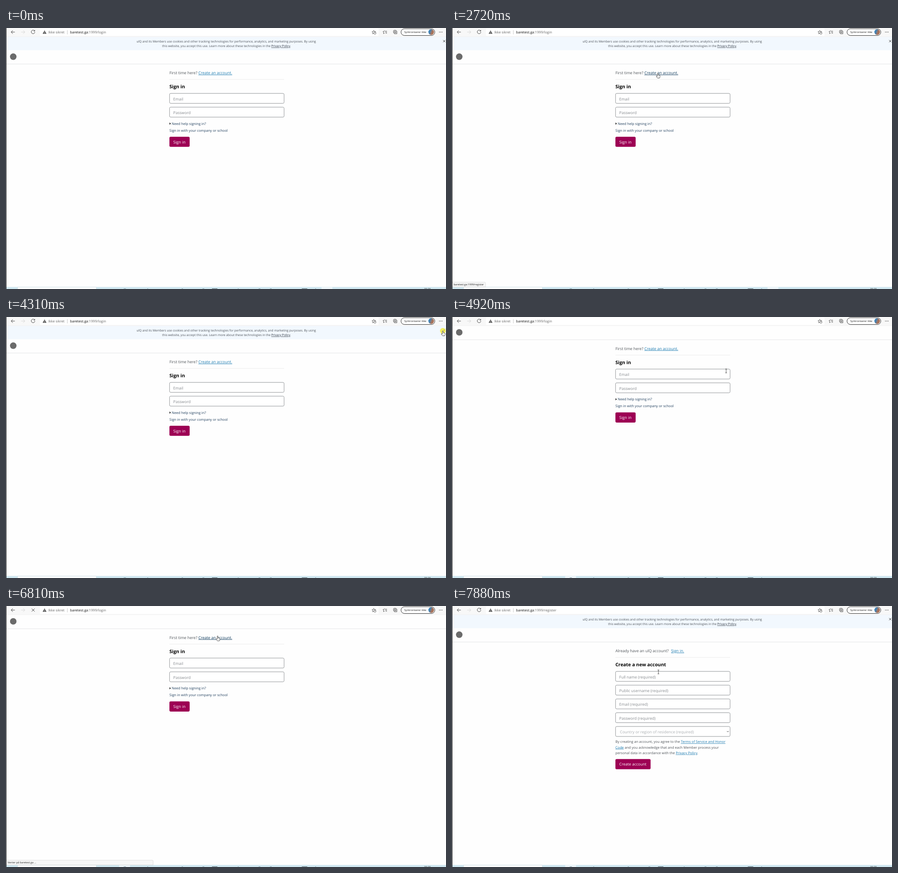
Recreate the animation shown at these times as an HTML page. Size 972 px wide and 576 px high, loop 8 s.

```html
<!DOCTYPE html>
<html lang="en">
<head>
<meta charset="utf-8">
<title>Sign in and register</title>
<style>
html, body { margin: 0; width: 100%; height: 100%; overflow: hidden; background: #fefefe; }
svg { display: block; width: 972px; height: 576px; }
text { font: 8.58px "Open Sans", "Noto Sans", sans-serif; fill: #50555a; white-space: pre; text-rendering: geometricPrecision; }
.title { font-size: 10.4px; font-weight: 700; fill: #000; }
.small { font-size: 7.65px; }
.navy { fill: #23415f; }
.note { font-size: 6.7px; fill: #4a4f55; }
.url { font-size: 7.62px; fill: #666; }
.tiny { font-size: 5.72px; fill: #222; }
.hint { fill: #85898d; }
.pale { fill: #a9adb0; }
.white { fill: #fff; }
.link { fill: #1a7ab0; text-decoration: underline; }
.hover { fill: #0e3a5c; }
.dark { fill: #222b35; text-decoration: underline; }
.icon { fill: none; stroke: #333; stroke-width: .9; }
</style>
</head>
<body>
<svg viewBox="0 0 972 576">
  <defs>
    <linearGradient id="photo" x2="1" y2=".4">
      <stop offset=".35" stop-color="#3f83b8"/><stop offset=".75" stop-color="#a9735a"/>
    </linearGradient>
  </defs>
  <rect width="972" height="576" fill="#fefefe"/>

  <g id="header">
    <path d="M0 79.5H972" stroke="#e4e5e6"/>
    <circle id="logo" cx="16" cy="63.3" r="7.2" fill="#6b6b6b"/>
  </g>

  <g id="banner">
    <rect y="19.5" width="972" height="29.5" fill="#f2f8fe"/>
    <text class="note" x="288.5" y="31.6">ulQ and its Members use cookies and other tracking technologies for performance, analytics, and marketing purposes. By using</text>
    <text class="note" x="345" y="42.3">this website, you accept this use. Learn more about these technologies in the <tspan class="dark">Privacy Policy</tspan>.</text>
    <path class="icon" d="M965.5 26.5l5 5m0-5l-5 5" stroke="#666"/>
  </g>

  <g id="login">
    <text x="361" y="102">First time here?</text>
    <text x="425" y="102" class="link" id="create">Create an account.</text>
    <path d="M361 113.5H614.5" stroke="#ececec"/>
    <text x="361" y="133" class="title">Sign in</text>
    <g id="loginFields"></g>
    <path d="M361.3 208.6l2.8 2.4-2.8 2.4z" fill="#111"/>
    <text x="366" y="213.9" class="small navy">Need help signing in?</text>
    <text x="361" y="228.7" class="small navy">Sign in with your company or school</text>
    <rect x="361" y="240" width="44.7" height="22.3" rx="2.8" fill="#9d0054"/>
    <text x="369.5" y="254.6" class="white" style="font-size:8.8px">Sign in</text>
  </g>

  <g id="register">
    <text x="361" y="102">Already have an ulQ account?</text>
    <text x="484" y="102" class="link">Sign in.</text>
    <path d="M361 113.5H614.5" stroke="#ececec"/>
    <text x="361" y="133" class="title">Create a new account</text>
    <g id="registerFields"></g>
    <path class="icon" d="M607.4 276l2 2 2-2" stroke="#555"/>
    <text x="361" y="302.3" class="small">By creating an account, you agree to the <tspan class="link">Terms of Service and Honor</tspan></text>
    <text x="361" y="314.5" class="small"><tspan class="link">Code</tspan> and you acknowledge that and each Member process your</text>
    <text x="361" y="326.7" class="small">personal data in accordance with the <tspan class="link">Privacy Policy</tspan>.</text>
    <rect x="361" y="337.8" width="77.7" height="22.4" rx="2.8" fill="#9d0054"/>
    <text x="369.5" y="352.4" class="white">Create account</text>
    <g id="social">
      <path d="M361 372.5H614.5" stroke="#ececec"/>
      <text x="361" y="391.5">or create an account using</text>
      <rect x="361" y="409.7" width="253.5" height="18.6" rx="3" fill="#eee"/>
      <rect x="361" y="430.5" width="253.5" height="18.6" rx="3" fill="#eee"/>
    </g>
  </g>

  <g id="toolbar">
    <rect width="972" height="19" fill="#f8f8f8"/>
    <path d="M0 19H972" stroke="#ececec" stroke-width=".8"/>
    <rect id="address" x="75" y="1" width="748" height="16.5" rx="2" fill="#fff"/>
    <path class="icon" d="M19.5 9H11.5M15 5.3L11.3 9l3.7 3.7"/>
    <path class="icon" d="M33.5 9h8M38 5.3L41.7 9 38 12.7" style="stroke:#d2d2d2"/>
    <path class="icon" id="reload" d="M63 6.2A4 4 0 1 0 63.8 9M63.6 4.6V7H61.2"/>
    <path class="icon" id="stop" d="M56.7 5.7l6.6 6.6m0-6.6l-6.6 6.6"/>
    <path d="M85.2 5.2l4.3 7.6h-8.6z" fill="#555"/>
    <path d="M85.2 7.8v2.5m0 .7v1" stroke="#fff" stroke-width=".8"/>
    <text class="url" x="93.5" y="12">Ikke sikret</text>
    <path d="M135.5 5v9" stroke="#bbb" stroke-width=".8"/>
    <text class="url" x="141.5" y="12"><tspan fill="#111">baretest.ga</tspan>:1999/<tspan id="path">login</tspan></text>
    <path class="icon" d="M812.5 5.3l1.2 2.5 2.8.4-2 1.4M812.5 5.3l-1.2 2.5-2.8.4 2 2-.5 2.8 2-1" style="stroke-width:.8"/>
    <circle class="icon" cx="815" cy="11.3" r="2.3" style="stroke-width:.8"/>
    <path class="icon" d="M836 5.5l-1 2.2-2.3.3 1.7 1.7-.5 2.8 2.3-1.3M837 7h4.5M838 9.3h3.5M838.5 11.6h3" style="stroke-width:.8"/>
    <path class="icon" d="M857.5 11.5l-1.5-1V6l1-1h4.500l1 1M858 7h5.500v5.800H858zM860.7 8.3v3.200M859.1 9.900h3.200" style="stroke-width:.8"/>
    <rect x="872.7" y="1.700" width="74.600" height="14.800" rx="7.400" fill="#fff" stroke="#333" stroke-width="1"/>
    <text class="tiny" x="879.700" y="11.100">Synkroniserer ikke</text>
    <circle cx="939.300" cy="9" r="6.200" fill="url(#photo)"/>
    <g fill="#333"><circle cx="957.500" cy="9" r=".8"/><circle cx="960.500" cy="9" r=".8"/><circle cx="963.500" cy="9" r=".8"/></g>
  </g>

  <g id="taskbar">
    <rect y="571.500" width="972" height="4.500" fill="#d0e8f1"/>
    <rect x="25.500" y="572" width="174" height="5" fill="#fff" stroke="#c4d4da" stroke-width=".6"/>
    <rect id="tile" y="571.500" width="24" height="4.500" fill="#eef6fa"/>
    <path d="M260 575.500h5M312 575.500h2M388 575.500h3M434 575.500h4M512 575.500h2M558 575.500h4M583 575.500h4M683 575.500h2" stroke="#7f9aa6"/>
    <path d="M455 575.500h12M653.500 575.500h12" stroke="#44535b"/>
    <text class="tiny" x="923.500" y="578.200">20:20</text>
  </g>

  <g id="status">
    <path id="statusBox" fill="#f7f7f7" stroke="#d2d2d2" stroke-width=".7"/>
    <text class="tiny" id="statusText" x="3.500" y="568.300"></text>
  </g>
  <rect width="1" height="576" fill="#222"/>

  <g id="mouse">
    <circle id="press" r="6.300" fill="#f3ec3c" opacity=".8"/>
    <g fill="#fff" stroke="#222" stroke-width=".75" stroke-linejoin="round">
      <path id="arrow" d="M0 0V8.800L2 7l1.400 3 1.400-.6L3.500 6.500H6z"/>
      <path id="hand" d="M-1 1C-1-.3 1-.3 1 1V4.200L4.200 4.900Q5 5.200 5 6V8L4 11H-.5L-3.400 7.400Q-3.300 6-2 6.400L-1 7.300Z"/>
      <path id="beam" d="M-1.800-4.300H1.800M0-4.300V4.300M-1.800 4.300H1.800"/>
    </g>
  </g>
</svg>
<script>
const LOOP = 8000, CLOSE = 4540, LOAD = 7110, SHIFT = -29.4;
const $ = id => document.getElementById(id);
const show = (id, on) => { $(id).style.display = on ? '' : 'none'; };
const put = (id, x, y) => $(id).setAttribute('transform', `translate(${x} ${y})`);

const fields = (id, labels) => {
  $(id).innerHTML = labels.map((label, i) => {
    const y = 144.3 + i * 30.4, pick = label.startsWith('Country');
    return `<rect x="361.3" y="${y}" width="253" height="22" rx="2.6" fill="#fff" stroke="#85898d" stroke-width=".9"/>
      <text x="${pick ? 371 : 369.5}" y="${y + 15.3}" class="${pick ? 'pale' : 'hint'}">${label}</text>`;
  }).join('');
};
fields('loginFields', ['Email', 'Password']);
fields('registerFields', ['Full name (required)', 'Public username (required)', 'Email (required)',
  'Password (required)', 'Country or region of residence (required)']);

// Pointer stops: time, x, y
const stops = [
  [350, 969, 575], [540, 957, 567], [750, 957, 567], [1540, 407, 20], [1600, 407, 20],
  [1760, 408, 9], [1900, 412, 10], [2320, 455, 98], [2640, 455, 98], [2720, 454.5, 99.5],
  [3010, 454.5, 99.5], [3760, 961, 34], [3830, 963.5, 30], [4080, 965, 30.5], [4310, 965, 30.5],
  [5080, 561, 130], [5160, 561, 130], [5940, 467.5, 66], [6810, 467.5, 66], [6960, 460, 68],
  [7500, 460, 68], [7780, 456, 148], [7880, 456, 145.5], [LOOP, 456, 145.5]
];
const pointer = t => {
  const i = Math.max(1, stops.findIndex(s => s[0] > t));
  const [t0, x0, y0] = stops[i - 1], [t1, x1, y1] = stops[i];
  const p = Math.max(0, (t - t0) / (t1 - t0)), e = p * p * (3 - 2 * p);
  return [x0 + (x1 - x0) * e, y0 + (y1 - y0) * e];
};

function draw(t) {
  const closed = t >= CLOSE && t < LOAD, loaded = t >= LOAD;
  const shift = closed ? SHIFT : 0;
  const [x, y] = pointer(t);
  const py = y - shift;
  const within = (x0, y0, x1, y1, v = py) => x > x0 && x < x1 && v > y0 && v < y1;

  show('banner', !closed);
  show('login', !loaded);
  show('register', loaded);
  show('social', t < 7200);
  show('logo', t < LOAD || t >= 7270);
  put('header', 0, shift);
  put('login', 0, shift);

  const onAddress = within(75, 0, 823, 18, y);
  const onLink = !loaded && within(424, 93, 500, 107);
  const onClose = !closed && within(957, 20, 972, 45, y);
  const onField = within(361, 144, 615, 166.5) || within(361, 174.5, 615, 197);
  const shape = onLink || onClose ? 'hand' : onField || onAddress ? 'beam' : 'arrow';
  for (const s of ['arrow', 'hand', 'beam']) show(s, s === shape);
  show('mouse', t >= 350);
  show('press', (t >= 4310 && t < 4470) || (t >= 6100 && t < 6320));
  put('mouse', x, y);
  $('create').classList.toggle('hover', onLink);
  $('address').setAttribute('fill', onAddress ? '#f3f3f3' : '#fff');

  const waiting = t >= 6410 && t < 7190;
  show('stop', t >= 6410 && t < 6960);
  show('reload', t < 6410 || t >= 6960);
  $('path').textContent = t < 6880 ? 'login' : 'register';

  show('status', waiting || (t >= 2320 && t < 3160) || (t >= 6100 && t < 6410));
  $('statusText').textContent = waiting ? 'Venter på baretest.ga ...' : 'baretest.ga:1999/register';
  $('statusBox').setAttribute('d', `M0 561H${waiting ? 323 : 72}q2 0 2 2V571.5H0z`);

  show('tile', t < 4310 || t >= 4700);
  $('tile').setAttribute('x', t < 4310 ? 697 : 250);
}

const start = performance.now();
function tick() {
  draw((performance.now() - start) % LOOP);
  requestAnimationFrame(tick);
}
tick();
</script>
</body>
</html>
```
